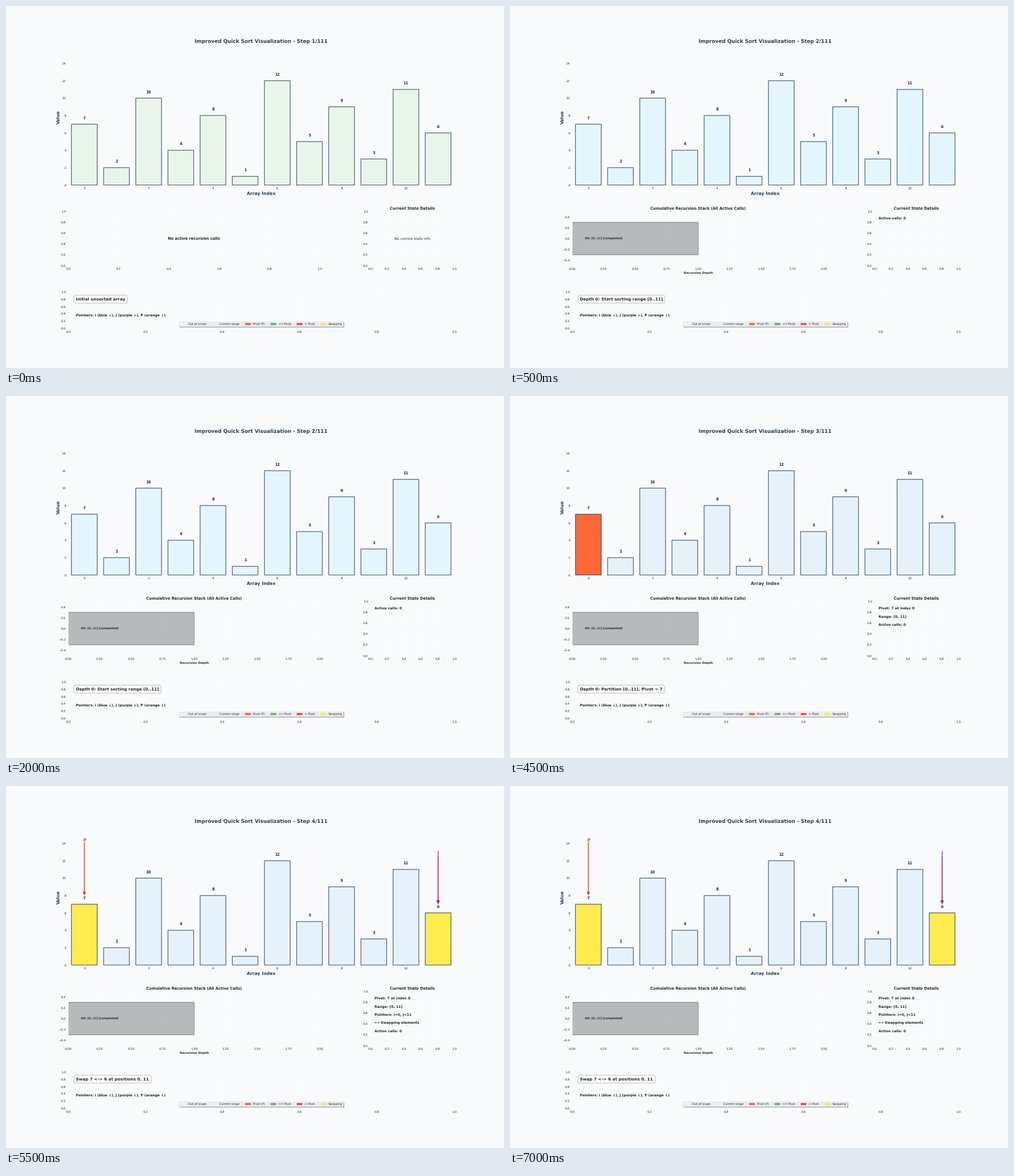
A matplotlib script for the animation above (8 s loop, 877 by 638 pixels).

```python
import matplotlib.pyplot as plt
from matplotlib.animation import FuncAnimation
from matplotlib.gridspec import GridSpec
from matplotlib.patches import Patch

W, H, DPI = 877, 638, 39.875
BG, INK = "#F8FAFC", "#2C3E50"
ORANGE, PURPLE, YELLOW = "#FF5722", "#9C27B0", "#FFEB3B"
IDLE, ACTIVE, RANGE = "#E8F5E8", "#E1F5FE", "#E3F2FD"
VALUES = [7, 2, 10, 4, 8, 1, 12, 5, 9, 3, 11, 6]
LEGEND = [("Out of scope", "#F5F5F5"), ("Current range", RANGE),
          ("Pivot (P)", "#F4511E"), ("<= Pivot", "#4CAF50"),
          ("> Pivot", "#E53935"), ("Swapping", YELLOW)]

plt.rcParams.update({
    "font.family": "DejaVu Sans", "text.color": ".15",
    "text.hinting": "none", "path.snap": False,
    "figure.facecolor": BG, "axes.facecolor": BG, "axes.linewidth": 0,
    "axes.labelcolor": ".15", "axes.axisbelow": True,
    "axes.grid": True, "grid.color": "white", "grid.linewidth": 1,
    "xtick.color": ".15", "ytick.color": ".15",
    "xtick.major.size": 0, "ytick.major.size": 0,
    "xtick.major.pad": 7, "ytick.major.pad": 7,
    "patch.linewidth": 0.3,
})

# Each step: base bar colour, special bars, state lines, message, pointers
STEPS = [
    dict(base=IDLE, message="Initial unsorted array"),
    dict(base=ACTIVE, message="Depth 0: Start sorting range [0..11]",
         state=["Active calls: 0"]),
    dict(base=RANGE, marked={0: ORANGE},
         message="Depth 0: Partition [0..11], Pivot = 7",
         state=["Pivot: 7 at index 0", "Range: [0, 11]", "Active calls: 0"]),
    dict(base=RANGE, marked={0: YELLOW, 11: YELLOW},
         message="Swap 7 <-> 6 at positions 0, 11",
         state=["Pivot: 7 at index 0", "Range: [0, 11]",
                "Pointers: i=0, j=11", "\u27f7 Swapping elements",
                "Active calls: 0"],
         pointers=[("P", 0, 14.19, 14.08, "#F4511E"),
                   ("j", 11, 12.78, 12.57, PURPLE)]),
]

fig = plt.figure(figsize=((W + 1e-6) / DPI, H / DPI), dpi=DPI)
grid = GridSpec(3, 2, figure=fig, height_ratios=[3, 1.2, 0.8],
                width_ratios=[3, 1], hspace=0.35, wspace=0.3,
                left=0.125, right=0.9, top=0.88, bottom=0.11)
bars_ax = fig.add_subplot(grid[0, :])
stack_ax = fig.add_subplot(grid[1, 0])
state_ax = fig.add_subplot(grid[1, 1])
info_ax = fig.add_subplot(grid[2, :])


def bold(ax, x, y, text, size, **kw):
    return ax.text(x, y, text, fontsize=size, fontweight="bold", **kw)


def draw_pointer(name, index, base, start, color):
    bold(bars_ax, index, base, name, 14, color=color, ha="center", va="baseline")
    bars_ax.annotate("", xy=(index, VALUES[index] + 0.98), xytext=(index, start),
                     arrowprops=dict(arrowstyle="-|>", color=color, lw=3,
                                     mutation_scale=20, shrinkA=0, shrinkB=0))


def draw_bars(number, step):
    ax = bars_ax
    marked = step.get("marked", {})
    colors = [marked.get(i, step["base"]) for i in range(len(VALUES))]
    ax.bar(range(len(VALUES)), VALUES, color=colors, edgecolor=INK,
           linewidth=2, alpha=0.9)
    for i, v in enumerate(VALUES):
        bold(ax, i, v + 0.48, str(v), 12, color="#22314A", ha="center", va="bottom")
    for pointer in step.get("pointers", []):
        draw_pointer(*pointer)
    ax.set_xlim(-0.5, len(VALUES) - 0.5)
    ax.set_ylim(0, max(VALUES) * 1.3)
    ax.grid(False)
    label = dict(fontsize=14, fontweight="bold", color=INK)
    ax.set_xlabel("Array Index", **label)
    ax.set_ylabel("Value", **label)
    ax.set_title(f"Improved Quick Sort Visualization - Step {number + 1}/111",
                 fontsize=16, fontweight="bold", color=INK, pad=20)


def draw_stack(active):
    ax = stack_ax
    if not active:
        bold(ax, 0.5, 0.5, "No active recursion calls", 12, ha="center", va="center")
        return
    ax.barh(0, 1, height=0.6, color="#9E9E9E", edgecolor="black",
            linewidth=1, alpha=0.7)
    bold(ax, 0.1, 0, "D0: [0..11] [completed]", 9, va="center")
    ax.set_xlim(0, 2)
    ax.set_ylim(-0.5, 0.5)
    ax.set_xlabel("Recursion Depth", fontsize=10, fontweight="bold")
    ax.set_title("Cumulative Recursion Stack (All Active Calls)",
                 fontsize=12, fontweight="bold")


def draw_state(lines):
    state_ax.set_title("Current State Details", fontsize=12, fontweight="bold")
    if not lines:
        state_ax.text(0.5, 0.5, "No current state info", fontsize=11,
                      ha="center", va="center")
    for k, line in enumerate(lines):
        bold(state_ax, 0.05, 0.9 - 0.15 * k, line, 11, va="top")


def draw_info(message):
    bold(info_ax, 0.02, 0.8, message, 13, va="center",
         bbox=dict(boxstyle="round,pad=0.5", facecolor="white",
                   edgecolor="gray", linewidth=1, alpha=0.9))
    bold(info_ax, 0.02, 0.35,
         "Pointers: i (blue \u2193), j (purple \u2193), P (orange \u2193)",
         11, va="center")
    handles = [Patch(facecolor=c, label=name, alpha=0.9, linewidth=0)
               for name, c in LEGEND]
    info_ax.legend(handles=handles, loc="lower center", ncol=6, fontsize=9,
                   frameon=True, fancybox=True, shadow=True,
                   facecolor="#EAEAF2", edgecolor="0.8")


def draw(tick):
    number = (tick + 4) // 5
    step = STEPS[number]
    for ax in (bars_ax, stack_ax, state_ax, info_ax):
        ax.clear()
    draw_bars(number, step)
    draw_stack(number > 0)
    draw_state(step.get("state", []))
    draw_info(step["message"])
    return []


anim = FuncAnimation(fig, draw, frames=16, interval=500, repeat=True,
                     repeat_delay=0, blit=False)
plt.show()
```
